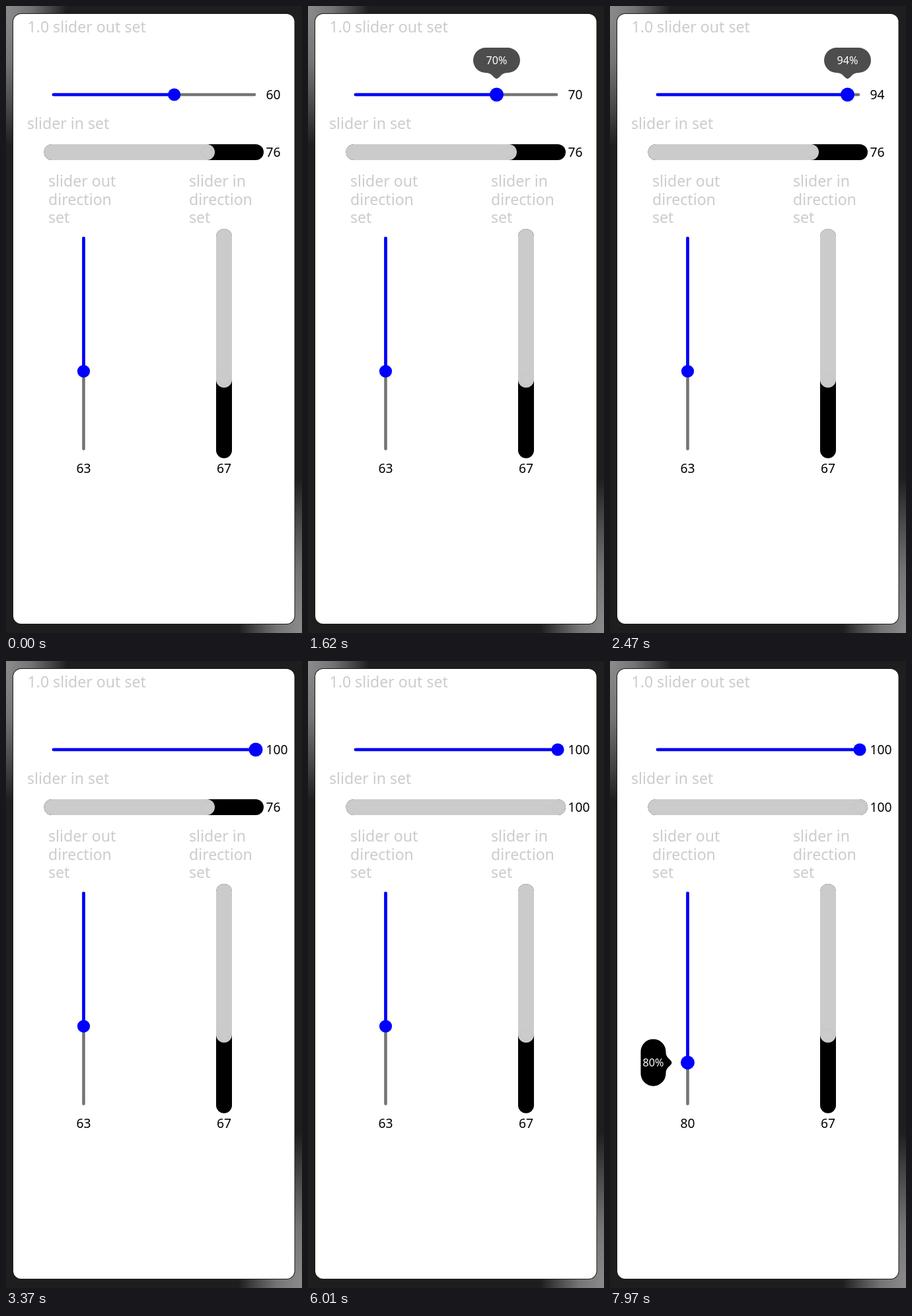
These frames come from a looping animation (448x948 px, 8000 ms). An HTML page:

```html
<!DOCTYPE html>
<html lang="en">
<head>
<meta charset="utf-8">
<title>Slider styles</title>
<style>
  html, body { margin: 0; width: 100%; height: 100%; overflow: hidden; background: #1e1e1e; }
  svg { display: block; width: 448px; height: 948px; }
  text { font-family: "Noto Sans", "Open Sans", sans-serif; }
  .label { font-size: 23.1px; fill: #ccc; }
  .value { font-size: 19.3px; fill: #000; }
  .mid { text-anchor: middle; }
  .tip text { font-size: 16.2px; fill: #fff; text-anchor: middle; }
  .tip path { fill: #4d4d4d; }
  .thin { stroke-width: 4.6; stroke-linecap: round; }
  .thick { stroke-width: 24; stroke-linecap: round; }
  .rest { stroke: #757575; }
  .blue { stroke: #00f; }
  .black { stroke: #000; }
  .light { stroke: #cbcbcb; }
  .knob { fill: #00f; }
  .ring { fill: none; stroke: #c5c5c5; stroke-width: .8; }
</style>
</head>
<body>
<svg viewBox="0 0 448 948">
  <defs>
    <radialGradient id="shine">
      <stop offset="0" stop-color="#8c8c8c"/>
      <stop offset=".4" stop-color="#747474"/>
      <stop offset=".75" stop-color="#444"/>
      <stop offset="1" stop-color="#1e1e1e"/>
    </radialGradient>
    <path id="bubble" d="M-16.5-71h33a19 19 0 0 1 0 38C9-33 7-29 3-25.4Q0-22.8-3-25.4C-7-29-9-33-16.5-33a19 19 0 0 1 0-38z"/>
  </defs>

  <rect width="448" height="948" fill="#1e1e1e"/>
  <ellipse rx="92" ry="212" fill="url(#shine)"/>
  <ellipse cx="448" cy="948" rx="96" ry="235" fill="url(#shine)"/>
  <rect x="11" y="12" width="425.5" height="922" rx="12" fill="#fff" stroke="#1a1a1a" stroke-width="2" paint-order="stroke"/>

  <g class="label">
    <text x="32.5" y="40">1.0 slider out set</text>
    <text x="32" y="186">slider in set</text>
    <text y="273"><tspan x="64">slider out</tspan><tspan x="64" dy="27.6">direction</tspan><tspan x="64" dy="27.6">set</tspan></text>
    <text y="273"><tspan x="277">slider in</tspan><tspan x="277" dy="27.6">direction</tspan><tspan x="277" dy="27.6">set</tspan></text>
  </g>

  <g id="outH">
    <path class="thin rest" d="M72 134H376"/>
    <line class="thin blue" x1="72" y1="134" y2="134"/>
    <circle class="knob" cy="134"/>
    <text class="value" x="393.5" y="141"></text>
    <g class="tip"><use href="#bubble" fill="#4d4d4d"/><text y="-46"></text></g>
  </g>

  <g id="inH">
    <path class="thick black" d="M69.6 221H378"/>
    <line class="thick light" x1="69.6" y1="221" y2="221"/>
    <circle class="ring" cy="221" r="8.5"/>
    <text class="value" x="393.5" y="227.6"></text>
  </g>

  <g id="outV">
    <path class="thin rest" d="M117.5 351V669.5"/>
    <line class="thin blue" x1="117.5" x2="117.5" y1="351"/>
    <circle class="knob" cx="117.5"/>
    <text class="value mid" x="117.5" y="705.6"></text>
    <g class="tip"><use href="#bubble" transform="rotate(-90)"/><text x="-52" y="5.8"></text></g>
  </g>

  <g id="inV">
    <path class="thick black" d="M330 349V671.7"/>
    <path class="thick light" d="M330 349V565"/>
    <circle class="ring" cx="330" cy="565" r="8.5"/>
    <text class="value mid" x="330" y="705.6">67</text>
  </g>
</svg>
<script>
const LOOP = 8000;

// Each drag is a list of [time, value] steps.
const drags = {
  outH: [[0, 60], [1000, 61], [1340, 65], [1460, 68], [1620, 70], [1730, 74], [1900, 78],
         [2070, 82], [2120, 85], [2320, 91], [2470, 94], [2580, 98], [2690, 100]],
  inH: [[0, 76], [4390, 80], [4610, 83], [4780, 86], [4890, 89], [5000, 93], [5110, 97], [5330, 100]],
  outV: [[0, 63], [7250, 64], [7370, 66], [7480, 68], [7630, 71], [7740, 74], [7850, 77], [7970, 80]]
};
const shown = { outH: [1000, 3370], outV: [7250, LOOP] };
const pressed = { outH: [1170, 3620], outV: [7370, LOOP] };

const within = (span, t) => t >= span[0] && t < span[1];
const valueAt = (steps, t) => steps.filter(s => s[0] <= t).pop()[1];

function drawSlider(id, t) {
  const root = document.getElementById(id);
  const value = valueAt(drags[id], t);
  const vertical = id === "outV";
  const pos = vertical ? 348.9 + value * 3.228 : 69.6 + value * 3.084;

  root.querySelector("line").setAttribute(vertical ? "y2" : "x2", Math.min(pos, vertical ? 669.5 : id === "outH" ? 376 : 378));
  const knob = root.querySelector("circle");
  knob.setAttribute(vertical ? "cy" : "cx", pos);
  root.querySelector(".value").textContent = value;

  if (!shown[id]) return;
  knob.setAttribute("r", within(pressed[id], t) ? 10.5 : 9.6);
  const tip = root.querySelector(".tip");
  tip.setAttribute("visibility", within(shown[id], t) ? "visible" : "hidden");
  tip.setAttribute("transform", vertical ? `translate(117.5 ${pos})` : `translate(${pos} 134)`);
  tip.querySelector("text").textContent = value + "%";
}

const start = performance.now();
function tick() {
  const t = (performance.now() - start) % LOOP;
  Object.keys(drags).forEach(id => drawSlider(id, t));
  requestAnimationFrame(tick);
}
tick();
</script>
</body>
</html>
```
